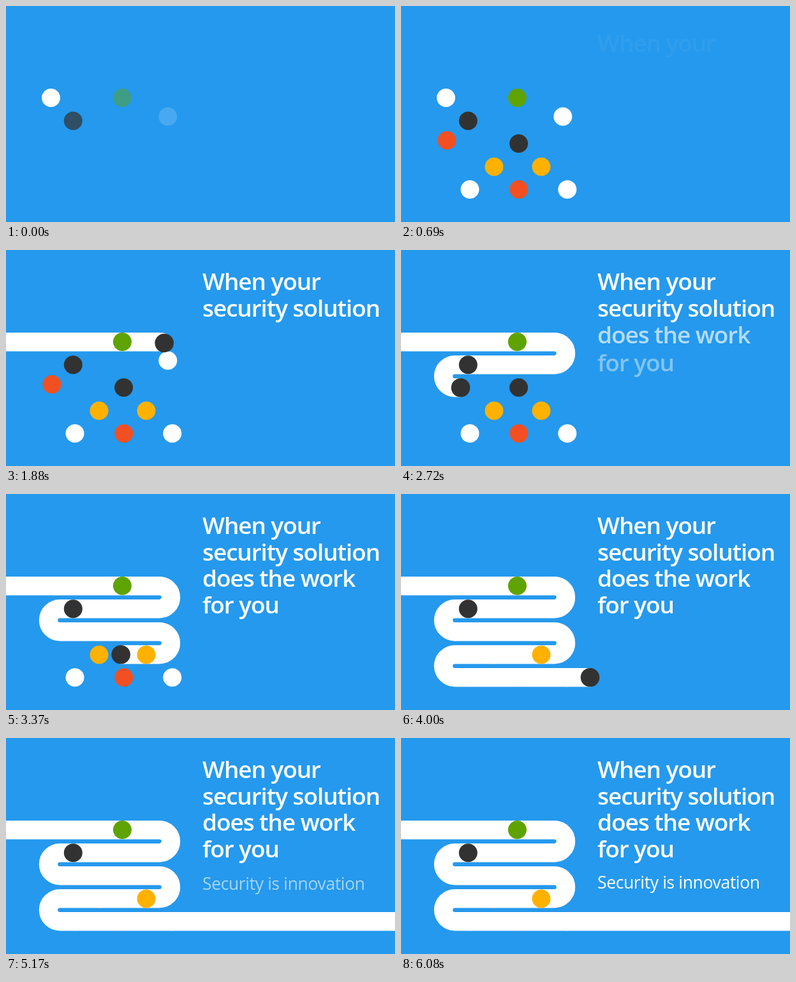
An HTML page for the animation above (6.81 s loop, 610 by 340 pixels).

```html
<!DOCTYPE html>
<html lang="en">
<head>
<meta charset="utf-8">
<title>Security is innovation</title>
<style>
  html, body { margin: 0; width: 100%; height: 100%; overflow: hidden; background: #2599ed; }
  svg { display: block; width: 610px; height: 340px; }
  text { fill: #fff; font-family: "Open Sans", "Noto Sans", sans-serif; }
  .title { font-size: 37px; font-weight: 600; letter-spacing: -1.1px; }
  .sub { font-size: 26.5px; font-weight: 400; letter-spacing: -0.36px; }
</style>
</head>
<body>
<svg viewBox="0 0 610 340">
  <rect width="610" height="340" fill="#2599ed"/>
  <g id="under"></g>
  <path id="track" fill="none" stroke="#fff" stroke-width="29.4"
    d="M-20 144.7H240.5a18 18 0 0 1 0 36H84.5a18 18 0 0 0 0 36H240.5a18 18 0 0 1 0 36H84.5a18 18 0 0 0 0 36H640"/>
  <g id="over"></g>
  <circle id="head" r="14.8" fill="#323232"/>
  <g id="words"></g>
</svg>
<script>
const LOOP = 6810, STEP = 70;
const WHITE = '#fff', DARK = '#323232', GREEN = '#5fa300', RED = '#f25022', YELLOW = '#ffb100';
const $ = id => document.getElementById(id);
const clamp = v => Math.min(1, Math.max(0, v));

function add(parent, tag, attrs, text = '') {
  const el = document.createElementNS('http://www.w3.org/2000/svg', tag);
  for (const name in attrs) el.setAttribute(name, attrs[name]);
  el.textContent = text;
  return $(parent).appendChild(el);
}

// Dots in order of appearance; those in "under" get swallowed by the track.
const dots = [
  [70.5, 144.5, WHITE, 'under'],
  [105.3, 180.7, DARK, 'over'],
  [182.4, 144.6, GREEN, 'over'],
  [253.8, 174, WHITE, 'under'],
  [72, 211.6, RED, 'under'],
  [184.6, 216.6, DARK, 'under'],
  [146, 253, YELLOW, 'under'],
  [220, 253, YELLOW, 'over'],
  [108, 288.8, WHITE, 'under'],
  [184.8, 288.8, RED, 'under'],
  [260.8, 288.8, WHITE, 'under'],
].map(([cx, cy, fill, layer]) => add(layer, 'circle', { cx, cy, r: 14.5, fill }));

const lines = [
  ['When your', 62.6, 680, 460],
  ['security solution', 104.6, 790, 460],
  ['does the work', 145.6, 2460, 410],
  ['for you', 187.6, 2550, 420],
  ['Security is innovation', 237, 4850, 560],
].map(([text, y, start, span], i) => ({
  y, start, span,
  el: add('words', 'text', { x: 308, class: i < 4 ? 'title' : 'sub' }, text),
}));

// Time and distance travelled by the head along the track.
const keys = [[1470, 0], [1890, 268.5], [2730, 538.6], [3360, 802.5], [3570, 892], [4270, 1367], [4480, 1509]];
const slope = i => (keys[i + 1][1] - keys[i][1]) / (keys[i + 1][0] - keys[i][0]);
const tangents = keys.map((_, i) => {
  if (i === 0) return slope(0);
  if (i === keys.length - 1) return slope(i - 1);
  const a = slope(i - 1), b = slope(i);
  return 2 * a * b / (a + b);
});

function distance(t) {
  const last = keys.length - 1;
  if (t <= keys[0][0]) return 0;
  if (t >= keys[last][0]) return keys[last][1];
  const i = keys.findIndex(k => k[0] > t) - 1;
  const [t0, d0] = keys[i], [t1, d1] = keys[i + 1];
  const h = t1 - t0, u = (t - t0) / h, v = 1 - u;
  return d0 * v * v * (1 + 2 * u) + d1 * u * u * (3 - 2 * u)
    + h * u * v * (tangents[i] * v - tangents[i + 1] * u);
}

function render(time) {
  const t = Math.floor((time + 12) / STEP) * STEP;

  dots.forEach((dot, i) => dot.setAttribute('opacity', clamp(1 + t / 190 - 0.28 * i)));

  const d = distance(t), track = $('track'), point = track.getPointAtLength(d);
  track.setAttribute('stroke-dasharray', `${d} 2000`);
  track.setAttribute('visibility', d > 0 ? 'visible' : 'hidden');
  $('head').setAttribute('cx', point.x);
  $('head').setAttribute('cy', point.y);

  for (const { el, y, start, span } of lines) {
    const a = clamp((t - start) / span);
    el.setAttribute('opacity', a);
    el.setAttribute('y', y + 10 * (1 - a) ** 2);
  }
}

const begin = performance.now();
function tick() {
  render((performance.now() - begin) % LOOP);
  requestAnimationFrame(tick);
}
tick();
</script>
</body>
</html>
```
